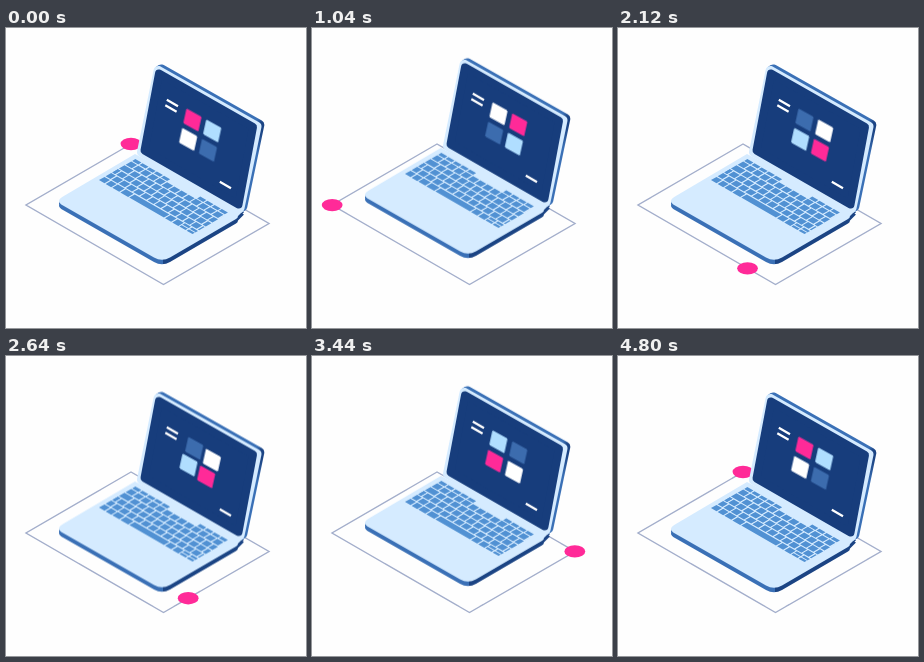
An HTML page without scripts for the animation above (4880 ms loop, 300 by 300 pixels).

```html
<!DOCTYPE html>
<html lang="en">
<head>
<meta charset="utf-8">
<title>Floating laptop</title>
<style>
  html, body { margin: 0; height: 100%; overflow: hidden; background: #fefefe; }
  svg { display: block; width: 100vw; height: 100vh; }

  .dot, .laptop, .tile { animation: 4880ms -2ms infinite; }

  .dot {
    fill: #ff2a98;
    offset-path: path("M125 116L20 177L157.5 256.5L263 195.5Z");
    offset-rotate: 0deg;
    animation-name: orbit;
    animation-timing-function: steps(120);
  }
  .laptop, .tile { animation-timing-function: cubic-bezier(.62, 0, 0, 1); }
  .laptop { animation-name: bob; }
  .tile { animation-name: shuffle; }

  /* 1200 ms beats: a 1040 ms move and a short rest */
  @keyframes orbit {
    0% { offset-distance: 0%; }
    98.36%, 100% { offset-distance: 100%; }
  }
  @keyframes bob {
    0%, 45.9%, 49.18%, 95.08%, 100% { transform: translateY(0); }
    21.31%, 24.59%, 70.49%, 73.77% { transform: translateY(-6.2px); }
  }
  @keyframes shuffle {
    0%, 95.08%, 100% { transform: translate(-10px, -10px); }
    21.31%, 24.59% { transform: translate(10px, -10px); }
    45.9%, 49.18% { transform: translate(10px, 10px); }
    70.49%, 73.77% { transform: translate(-10px, 10px); }
  }

  .round { stroke-linejoin: round; }
  .keys { stroke: #5191d3; stroke-width: 6.4; stroke-dasharray: 7 1.3; }
</style>
</head>
<body>
<svg viewBox="0 0 300 300">
  <defs>
    <linearGradient id="side" gradientUnits="userSpaceOnUse" x1="0" x2="300" y1="0" y2="0">
      <stop offset=".523" stop-color="#3a70b6"/>
      <stop offset=".523" stop-color="#1b4484"/>
    </linearGradient>
    <linearGradient id="back" gradientUnits="userSpaceOnUse" x1="0" x2="300" y1="0" y2="0">
      <stop offset=".83" stop-color="#3a70b6"/>
      <stop offset=".845" stop-color="#1b4484"/>
    </linearGradient>
    <path id="plate" d="M129 126L57 168.5Q49 173 57 177.5L148 229.5Q156 234 164 229.5L230 191Q232 190 232 188L238 182Z"/>
    <path id="lid" class="round" stroke-width="10" d="M152.5 43L250.5 98.5L233.5 180L136 124Z"/>
    <rect id="square" x="-7.6" y="-7.6" width="15.2" height="15.2" rx="1"/>
  </defs>

  <path d="M125 116L20 177L157.5 256.5L263 195.5Z" fill="none" stroke="#a3aecb" stroke-width="1.4"/>
  <ellipse class="dot" rx="10.4" ry="6.2"/>

  <g class="laptop">
    <g fill="url(#side)">
      <use href="#plate" y="4.6"/>
      <use href="#plate" y="2.3"/>
    </g>
    <use href="#plate" fill="#d5ebff"/>

    <g class="keys" transform="matrix(.866 .5 -.866 .5 129.5 131)">
      <path d="M0 2H41M75 2H108" stroke-width="3.6"/>
      <path d="M0 8.2H108"/>
      <path d="M0 15.9H108" stroke-dasharray="10.5 1.3 7 1.3 7 1.3 7 1.3 7 1.3 7 1.3 7 1.3 7 1.3 7 1.3 7 1.3 7 1.3 7 1.3"/>
      <path d="M0 23.6H108" stroke-dashoffset="-4.5"/>
      <path d="M0 23.6H3.2" stroke-dasharray="none"/>
      <path d="M0 31.3H108" stroke-dashoffset="1.5"/>
      <path d="M0 39H108" stroke-dasharray="6.4 1.3 6.4 1.3 8 1.3 9 1.3 40 1.3 7 1.3 7 1.3 7 1.3 8"/>
      <path d="M92 39H108" stroke="#d5ebff" stroke-width="1.1" stroke-dasharray="none"/>
    </g>

    <g fill="url(#back)" stroke="url(#back)">
      <use href="#lid" x="2.8" y="-1.6"/>
      <use href="#lid" x="1.4" y="-.8"/>
    </g>
    <use href="#lid" fill="#d5ebff" stroke="#d5ebff"/>
    <path class="round" d="M153 45.5L247 99L232.5 176.5L138.5 122.5Z" fill="#173d7c" stroke="#173d7c" stroke-width="8"/>
    <path d="M160.8 71.8L172 78.2M159.3 77.2L170.6 83.7M213.8 153.8L225 160.2" stroke="#fff" stroke-width="2.2"/>

    <g transform="matrix(.99 .55 -.215 .97 194.2 107.2)">
      <g fill="#ff2a98"><use class="tile" href="#square"/></g>
      <g fill="#b0deff" transform="rotate(90)"><use class="tile" href="#square"/></g>
      <g fill="#3c6cae" transform="rotate(180)"><use class="tile" href="#square"/></g>
      <g fill="#fff" transform="rotate(270)"><use class="tile" href="#square"/></g>
    </g>
  </g>
</svg>
</body>
</html>
```
